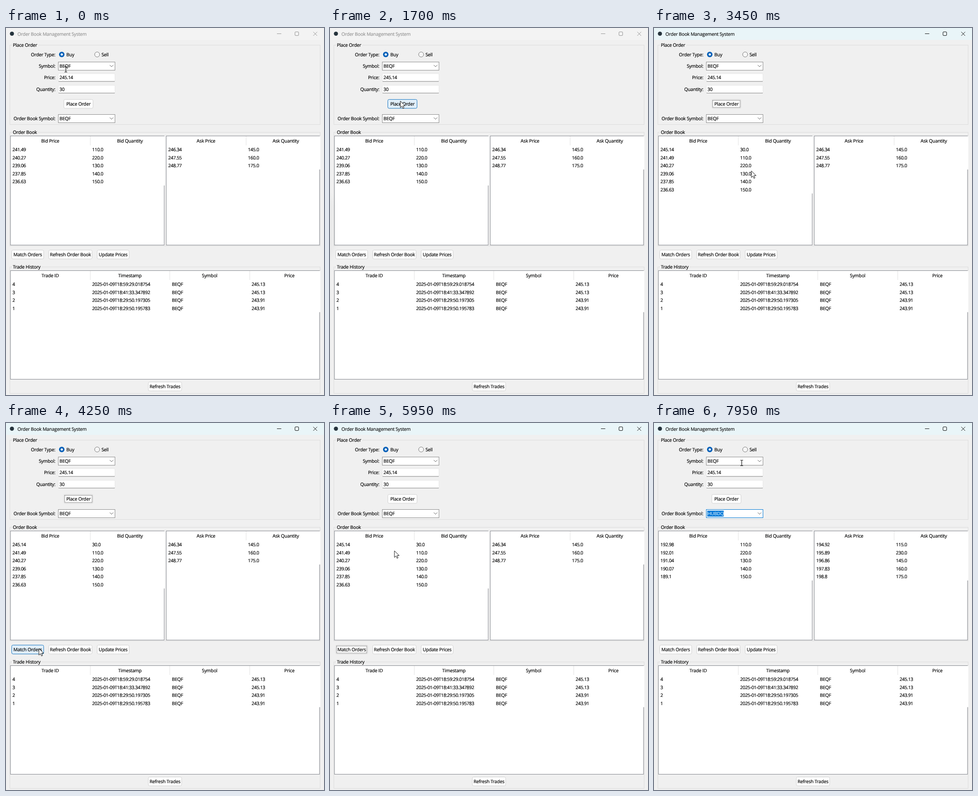
These frames come from a looping animation (696 by 804 pixels, 8 s). An HTML page:

```html
<!DOCTYPE html>
<html lang="en">
<head>
<meta charset="utf-8">
<title>Order Book Management System</title>
<style>
html, body { margin: 0; width: 100%; height: 100%; overflow: hidden; background: #f0f0f0; }
svg { display: block; width: 696px; height: 804px; }
text {
  font: 10.2px "Open Sans", "Noto Sans", sans-serif; letter-spacing: -.22px; white-space: pre;
  fill: #000; stroke: #000; stroke-width: .2px; text-rendering: geometricPrecision;
}
.num { letter-spacing: -.38px; }
.mid { text-anchor: middle; }
.end { text-anchor: end; }
.caption text { fill: currentColor; stroke: currentColor; }
.line { fill: none; stroke: #dcdcdc; }
.tree { fill: #fff; stroke: #82858c; }
.btn { fill: #fdfdfd; stroke: #d2d2d2; }
.hot { fill: #e0eef9; stroke: #1a78c2; }
.dots { fill: none; stroke: #222; stroke-dasharray: 1 1; }
.inv text { fill: #fff; stroke: none; }

/* hard switches */
.step { animation: 8s step-end infinite; }
.bar { animation-name: bar; }
.caption { animation-name: caption; }
.placeHot { animation-name: placeHot; }
.placeFocus { animation-name: placeFocus; }
.matchHot { animation-name: matchHot; }
.matchFocus { animation-name: matchFocus; }
.first { animation-name: first; }
.second { animation-name: second; }
.before { animation-name: before; }
.after { animation-name: after; }
.open { animation-name: open; }
.arrowHot { animation-name: arrowHot; }
.pick { animation-name: pick; }
.beam { animation-name: beam; }
.arrow { animation-name: arrow; }
@keyframes bar {
  0% { fill: #f3f3f3 } 18.2% { fill: #e9f5f8 } 20.9% { fill: #f3f3f3 }
  36.4% { fill: #e9f5f8 } 56.5% { fill: #eff4f6 } 67.4% { fill: #e9f5f8 }
}
@keyframes caption {
  0% { color: #959595 } 18.2% { color: #111 } 20.9% { color: #959595 }
  36.4% { color: #111 } 56.5% { color: #959595 } 67.4% { color: #111 }
}
@keyframes placeHot { 0% { opacity: 0 } 10% { opacity: 1 } 23.8% { opacity: 0 } }
@keyframes placeFocus { 0% { opacity: 0 } 36.4% { opacity: 1 } 55.3% { opacity: 0 } }
@keyframes matchHot { 0% { opacity: 0 } 51.6% { opacity: 1 } 59.4% { opacity: 0 } }
@keyframes matchFocus { 0% { opacity: 0 } 67.4% { opacity: 1 } 80.6% { opacity: 0 } }
@keyframes first { 0% { opacity: 1 } 36.4% { opacity: 0 } }
@keyframes second { 0% { opacity: 0 } 36.4% { opacity: 1 } 90.6% { opacity: 0 } }
@keyframes before { 0% { opacity: 1 } 90.6% { opacity: 0 } }
@keyframes after { 0% { opacity: 0 } 90.6% { opacity: 1 } }
@keyframes open { 0% { opacity: 0 } 80.6% { opacity: 1 } 90.6% { opacity: 0 } }
@keyframes arrowHot { 0% { opacity: 0 } 78.2% { opacity: 1 } 90.6% { opacity: 0 } }
@keyframes pick { 0% { transform: none } 86.3% { transform: translateY(14px) } 88.2% { transform: translateY(28px) } }
@keyframes beam { 0% { opacity: 1 } 9.4% { opacity: 0 } 94.6% { opacity: 1 } 95.3% { opacity: 0 } 97.1% { opacity: 1 } }
@keyframes arrow { 0% { opacity: 0 } 9.4% { opacity: 1 } 94.6% { opacity: 0 } 95.3% { opacity: 1 } 97.1% { opacity: 0 } }

/* white labels of the highlighted list entries */
.lit0 { animation-name: lit0; }
.lit1 { animation-name: lit1; }
.lit2 { animation-name: lit2; }
@keyframes lit0 { 0% { opacity: 1 } 86.3% { opacity: 0 } }
@keyframes lit1 { 0% { opacity: 0 } 86.3% { opacity: 1 } 88.2% { opacity: 0 } }
@keyframes lit2 { 0% { opacity: 0 } 88.2% { opacity: 1 } }

.dialog { animation: dialog 8s linear infinite; filter: drop-shadow(0 7px 11px rgba(0,0,0,.35)); }
@keyframes dialog {
  0%, 21% { opacity: 0; transform: translateX(-12px) }
  22.5%, 36% { opacity: 1; transform: none }
  37%, 56.5% { opacity: 0; transform: translateX(-12px) }
  58%, 67.2% { opacity: 1; transform: none }
  68.2%, 100% { opacity: 0; transform: translateX(-12px) }
}
.pointer { animation: pointer 8s ease-in-out infinite; }
@keyframes pointer {
  0%, 3.75% { transform: translate(131px, 90px) }
  11.25%, 22.5% { transform: translate(154px, 160px) }
  31.25%, 37% { transform: translate(-40px, 472px) }
  43.125% { transform: translate(213px, 313px) }
  53%, 57.5% { transform: translate(72px, 494px) }
  60.625% { transform: translate(83px, 495px) }
  65.5%, 68% { transform: translate(-40px, 472px) }
  74.375% { transform: translate(141px, 280px) }
  79%, 81.5% { transform: translate(230px, 196px) }
  85% { transform: translate(223px, 219px) }
  89%, 93.1% { transform: translate(195px, 241px) }
  99.375%, 100% { transform: translate(192px, 87px) }
}
</style>
</head>
<body>
<svg viewBox="0 0 696 804"></svg>
<script>
const SYMBOLS = ["BEQF", "CWKD", "HUBDQ", "RKXH", "ZXRE"];
const [MAIN, , PICKED] = SYMBOLS;
const ROW = 17.5;
const COLUMN = 174.5;

const text = (x, cy, s, cls = "") => `<text x="${x}" y="${cy + 3.7}" class="${cls}">${s}</text>`;
const rect = (x, y, w, h, attrs = "") => `<rect x="${x}" y="${y}" width="${w}" height="${h}" ${attrs}/>`;
const path = (d, attrs = "") => `<path d="${d}" ${attrs}/>`;
const group = (cls, ...parts) => `<g class="${cls}">${parts.join("")}</g>`;
const step = (name, ...parts) => group("step " + name, ...parts);

const button = (x, y, w, label, cls = "btn") =>
  rect(x + .5, y + .5, w, 19.5, `rx="3" class="${cls}"`) + text(x + w / 2 + .5, y + 10, label, "mid");

const focusRing = (x, y, w) => rect(x + 2.5, y + 2.5, w - 4, 15.5, 'class="dots"');

const frame = (y, bottom, label, labelWidth) =>
  rect(8.5, y + .5, 679, bottom - y, 'class="line"') +
  rect(13, y - 4, labelWidth, 9, 'fill="#f0f0f0"') + text(15, y, label);

const chevron = y => path(`M227 ${y - 2}l4 4 4-4`, 'fill="none" stroke="#666"');

const combo = (y, stroke = "#8b8b8b") =>
  rect(114.5, y - 8.5, 124, 18, `fill="#fff" stroke="${stroke}"`) + chevron(y);

const entry = (y, value) =>
  rect(114.5, y - 8.5, 124, 17, 'rx="2" fill="#fff" stroke="#e6e6e6"') +
  path(`M115 ${y + 8.5}h123`, 'stroke="#858585"') + text(117, y, value, "num");

function tree(x, y, right, bottom, headings) {
  const heads = headings.map((label, i) =>
    text(x + COLUMN * (i + .5) + .5, y + 11, label, "mid") +
    (i ? path(`M${Math.round(x + COLUMN * i) + .5} ${y + 1}v20`, 'stroke="#e2e2e2"') : ""));
  return rect(x + .8, y + .5, right - x - .6, bottom - y, 'class="tree"') + heads.join("");
}

// Filled rows hide the right border of the list beside them.
function rows(x, y, right, data) {
  const cover = rect(right - 1, y + 1, 3, 20.5 + ROW * data.length, 'fill="#fff"');
  return cover + data.map((cells, r) => cells.map((cell, c) =>
    text(x + 4 + COLUMN * c, y + 30.5 + ROW * r, cell, /\d/.test(cell) ? "num" : "")).join("")).join("");
}

const bids = data => rows(10, 236, 346, data);
const asks = data => rows(351, 236, 686, data);

const oldBids = [["241.49", "110.0"], ["240.27", "220.0"], ["239.06", "130.0"], ["237.85", "140.0"], ["236.63", "150.0"]];
const newBids = [["245.14", "30.0"], ...oldBids];
const pickedBids = [["192.98", "110.0"], ["192.01", "220.0"], ["191.04", "130.0"], ["190.07", "140.0"], ["189.1", "150.0"]];
const mainAsks = [["246.34", "145.0"], ["247.55", "160.0"], ["248.77", "175.0"]];
const pickedAsks = [["194.92", "115.0"], ["195.89", "230.0"], ["196.86", "145.0"], ["197.83", "160.0"], ["198.8", "175.0"]];
const trades = [
  ["4", "18:59:29.018754", "245.13"], ["3", "18:41:33.347892", "245.13"],
  ["2", "18:29:50.197305", "243.91"], ["1", "18:29:50.195783", "243.91"]
].map(([id, time, price]) => [id, "2025-01-09T" + time, MAIN, price]);

const titleBar =
  rect(0, 0, 696, 26, 'class="step bar"') +
  '<circle cx="13" cy="12.5" r="4.5" fill="#26343d"/>' +
  step("caption", text(25, 13, "Order Book Management System"),
    path("M593 12.5h9.5M672.5 8.5l8.5 8.5m0-8.5l-8.5 8.5", 'fill="none" stroke="currentColor"'),
    rect(632.5, 8.5, 8, 8, 'rx="1.5" fill="none" stroke="currentColor"'));

const form =
  frame(37, 211, "Place Order", 58) +
  text(108, 58, "Order Type:", "end") +
  '<circle cx="122" cy="58" r="6" fill="#005fb8"/><circle cx="122" cy="58" r="2.5" fill="#fff"/>' +
  text(132, 58, "Buy") +
  '<circle cx="199.5" cy="58" r="5.5" fill="#f6f6f6" stroke="#777"/>' + text(209, 58, "Sell") +
  text(108, 83.5, "Symbol:", "end") + combo(83) + text(117, 83.5, MAIN) +
  text(108, 108.5, "Price:", "end") + entry(108.5, "245.14") +
  text(108, 134, "Quantity:", "end") + entry(134, "30") +
  button(126, 156, 64, "Place Order") +
  step("placeHot", button(126, 156, 64, "Place Order", "hot")) +
  step("placeFocus", focusRing(126, 156, 64)) +
  text(108, 198.5, "Order Book Symbol:", "end") +
  step("before", combo(198), text(117, 198.5, MAIN)) +
  step("after", combo(198, "#0078d4"), rect(116.5, 192, 36, 13, 'fill="#0078d7"'),
    group("inv", text(117, 198.5, PICKED))) +
  step("arrowHot", rect(224.5, 189.5, 14, 18, 'fill="#cce4f7" stroke="#4a90c4"'), chevron(198));

const book =
  frame(228, 477, "Order Book", 56) +
  tree(9, 236, 346, 475, ["Bid Price", "Bid Quantity"]) +
  tree(350, 236, 686, 475, ["Ask Price", "Ask Quantity"]) +
  step("first", bids(oldBids)) + step("second", bids(newBids)) + step("after", bids(pickedBids)) +
  step("before", asks(mainAsks)) + step("after", asks(pickedAsks)) +
  button(12, 486, 70, "Match Orders") +
  step("matchHot", button(12, 486, 70, "Match Orders", "hot")) +
  step("matchFocus", focusRing(12, 486, 70)) +
  button(93, 486, 95, "Refresh Order Book") + button(199, 486, 70, "Update Prices");

const history =
  frame(523, 800, "Trade History", 64) +
  tree(9, 531, 686, 769, ["Trade ID", "Timestamp", "Symbol", "Price"]) +
  rows(10, 531, 686, trades) +
  button(311, 775, 73, "Refresh Trades");

const option = (s, i) => text(116.5, 216 + 14 * i, s);
const dropdown = step("open",
  rect(114.5, 207.5, 124, 73, 'fill="#fff" stroke="#666"'),
  ...SYMBOLS.map(option),
  step("pick", rect(115, 208.5, 123, 14.5, 'fill="#0078d7"')),
  ...SYMBOLS.slice(0, 3).map((s, i) => step(`inv lit${i}`, option(s, i))));

const dialog = group("dialog",
  rect(-200, 366, 211, 126, 'rx="6" fill="#fff"'),
  path("M-200 391V366H5a6 6 0 0 1 6 6v19z", 'fill="#e9f5f8"'),
  path("M-200 457H11v29a6 6 0 0 1-6 6H-200z", 'fill="#f0f0f0"'),
  path("M-5 374l8 8m0-8l-8 8", 'stroke="#222"'));

const pointer = group("pointer",
  step("arrow", path("M0 0V14.5L3.4 11.3 5.7 16.4 8 15.4 5.8 10.4H10.4Z", 'fill="#fff" stroke="#111" stroke-linejoin="round"')),
  step("beam", path("M-3-5.5h2.2L0-5l.8-.5H3M0-5V6M-3 6.5h2.2L0 6l.8.5H3", 'fill="none" stroke="#111" stroke-width="1.2"')));

document.querySelector("svg").innerHTML = titleBar + form + book + history + dropdown + dialog + pointer;
</script>
</body>
</html>
```
